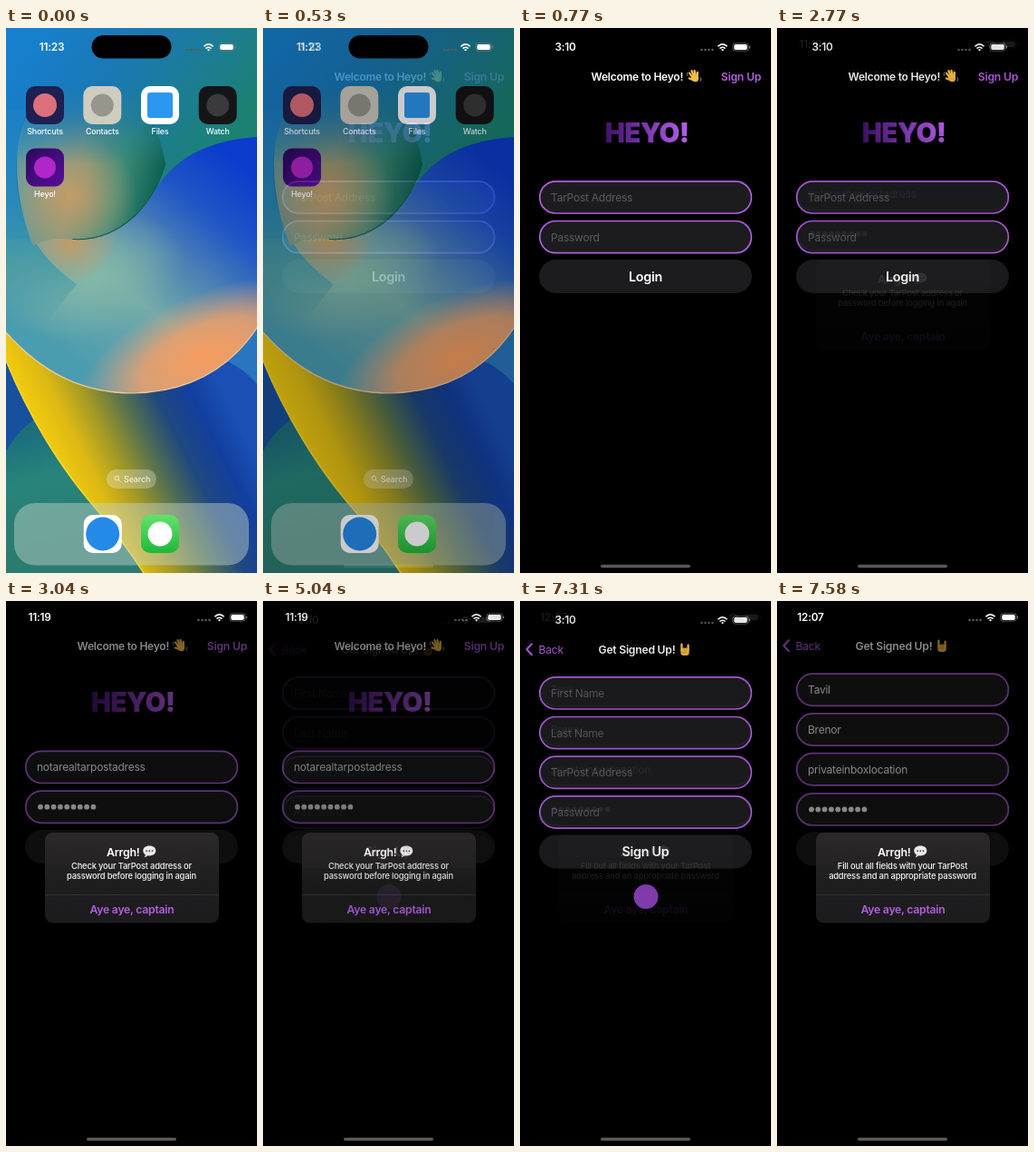
Recreate the animation shown at these times as an HTML page. Size 277x600 px, loop 8 s.

```html
<!DOCTYPE html>
<html lang="en">
<head>
<meta charset="utf-8">
<title>App walkthrough</title>
<style>
html, body { margin: 0; width: 100%; height: 100%; overflow: hidden; background: #000; }
svg { display: block; width: 100%; height: 100%; }
text { font-family: Inter, Roboto, sans-serif; letter-spacing: -.02em; white-space: pre; }
</style>
</head>
<body>
<svg id="stage" viewBox="0 0 277 600">
  <defs>
    <linearGradient id="word"><stop stop-color="#3f1263"/><stop offset=".45" stop-color="#7a34ad"/><stop offset="1" stop-color="#b65fe8"/></linearGradient>
    <linearGradient id="sheet" x2="0" y2="1"><stop stop-color="#2c292a"/><stop offset=".55" stop-color="#1f1e1f"/><stop offset="1" stop-color="#1c1b1d"/></linearGradient>
    <linearGradient id="tile" x2="1" y2="1"><stop stop-color="#2b0a5c"/><stop offset="1" stop-color="#5a0d9c"/></linearGradient>
    <linearGradient id="green" x2="0" y2="1"><stop stop-color="#62e36a"/><stop offset="1" stop-color="#1fb83a"/></linearGradient>
    <linearGradient id="sky" gradientUnits="userSpaceOnUse" x1="30" y1="0" x2="225" y2="150"><stop stop-color="#1680cf"/><stop offset=".4" stop-color="#1a78b4"/><stop offset=".72" stop-color="#1c7d92"/><stop offset="1" stop-color="#1b8272"/></linearGradient>
    <linearGradient id="curl" gradientUnits="userSpaceOnUse" x1="20" y1="130" x2="172" y2="165"><stop stop-color="#5f9aa0"/><stop offset=".4" stop-color="#84997e"/><stop offset=".7" stop-color="#3f8d78"/><stop offset="1" stop-color="#0d6052"/></linearGradient>
    <linearGradient id="rise" gradientUnits="userSpaceOnUse" x1="0" y1="70" x2="0" y2="150"><stop stop-color="#000"/><stop offset=".35" stop-color="#333"/><stop offset="1" stop-color="#fff"/></linearGradient>
    <linearGradient id="side" gradientUnits="userSpaceOnUse" x1="0" y1="90" x2="0" y2="330"><stop stop-color="#1a80c8"/><stop offset=".45" stop-color="#2a8ab8"/><stop offset=".72" stop-color="#4a9ca4" stop-opacity=".85"/><stop offset="1" stop-color="#4a9ca4" stop-opacity="0"/></linearGradient>
    <linearGradient id="orb" gradientUnits="userSpaceOnUse" x1="250" y1="145" x2="70" y2="365"><stop stop-color="#0c3ccb"/><stop offset=".22" stop-color="#1f55c6"/><stop offset=".42" stop-color="#4a80b4"/><stop offset=".65" stop-color="#74aaa8"/><stop offset="1" stop-color="#4a9cb0"/></linearGradient>
    <linearGradient id="band" gradientUnits="userSpaceOnUse" x1="60" y1="490" x2="240" y2="400"><stop stop-color="#f2cb10"/><stop offset=".16" stop-color="#dcb914"/><stop offset=".31" stop-color="#a59a24"/><stop offset=".49" stop-color="#55704f"/><stop offset=".66" stop-color="#1f4880"/><stop offset=".84" stop-color="#123f9e"/><stop offset="1" stop-color="#1a50b4"/></linearGradient>
    <linearGradient id="floor" gradientUnits="userSpaceOnUse" x1="0" y1="455" x2="30" y2="570"><stop stop-color="#1d6f7c"/><stop offset=".4" stop-color="#27847a"/><stop offset="1" stop-color="#2b7c70"/></linearGradient>
    <radialGradient id="peach"><stop stop-color="#f89c5c"/><stop offset=".5" stop-color="#eda06c" stop-opacity=".85"/><stop offset="1" stop-color="#d8a080" stop-opacity="0"/></radialGradient>
    <radialGradient id="mint"><stop stop-color="#84b8a8"/><stop offset="1" stop-color="#84b8a8" stop-opacity="0"/></radialGradient>
    <radialGradient id="tan"><stop stop-color="#c29c66"/><stop offset="1" stop-color="#b89d70" stop-opacity="0"/></radialGradient>
    <mask id="riseMask"><rect width="277" height="600" fill="url(#rise)"/></mask>
    <clipPath id="orbClip"><path d="M277 120C215 124 184 148 165 178C146 211 115 236 74 232H0V335C40 380 85 402 140 402C198 401 245 378 277 330Z"/></clipPath>
    <clipPath id="curlClip"><path d="M12 150C12 90 42 56 92 56C143 60 168 100 176 150C163 196 125 236 74 233C45 229 30 240 30 240C18 210 12 180 12 150Z"/></clipPath>
  </defs>
</svg>
<script>
const LOOP = 8000, STEP = 30, STEPS = 10;
const CUTS = [500, 2770, 5040, 7310];
const PURPLE = '#b35fe0', FIELD = '#1c1c1e', HINT = '#5b5b60';
const APP = 'Heyo!', MAIL = 'TarPost';

const text = (x, y, s, size, fill = '#fff', weight = 400, anchor = 'start') =>
  `<text x="${x}" y="${y + size * .363}" font-size="${size}" fill="${fill}" font-weight="${weight}" text-anchor="${anchor}">${s}</text>`;
const mid = (x, y, s, size, fill, weight) => text(x, y, s, size, fill, weight, 'middle');
const box = (x, y, w, h, r, fill, extra = '') =>
  `<rect x="${x}" y="${y}" width="${w}" height="${h}" rx="${r}" fill="${fill}" ${extra}/>`;
const dot = (x, y, r, fill) => `<circle cx="${x}" cy="${y}" r="${r}" fill="${fill}"/>`;
const oval = (x, y, rx, ry, fill, turn = 0) =>
  `<ellipse rx="${rx}" ry="${ry}" fill="${fill}" transform="translate(${x} ${y}) rotate(${turn})"/>`;
const path = (d, fill, extra = '') => `<path d="${d}" fill="${fill}" ${extra}/>`;
const line = (d, color, width) =>
  path(d, 'none', `stroke="${color}" stroke-width="${width}" stroke-linecap="round" stroke-linejoin="round"`);
const row = (n, f) => Array.from({ length: n }, (_, i) => f(i)).join('');
const at = (x, y, s, turn = 0) => `<g transform="translate(${x} ${y}) rotate(${turn})">${s}</g>`;

function status(time, x, y, right) {
  const wifi = line('M-4.6 -1.2Q0 -5 4.6 -1.2', '#fff', 1.7) + line('M-2.5 1.2Q0 -.8 2.5 1.2', '#fff', 1.6) + dot(0, 3.1, 1.2, '#fff');
  const battery = box(-8.6, -4.1, 17.2, 8.2, 2.5, 'none', 'stroke="#777" stroke-width=".8"') +
    box(-7.2, -2.9, 14.4, 5.8, 1.6, '#fff') + box(9.4, -1.4, 1.2, 2.8, .6, '#777');
  return mid(x, y, time, 11.8, '#fff', 600) +
    row(4, i => dot(right - 43 + i * 4, y + 3, 1.3, '#5c5c5f')) +
    at(right - 20, y, wifi) + at(right, y, battery);
}

const wave = (x, y) => at(x, y,
  line('M-2 0L-3.6 -5M0 -1L-.6 -6.5M2 -1L2.4 -5.8M3.6 1L5 -3M-2 3.5L-5.6 .5', '#f6bd45', 2.3) +
  path('M-3.2 -.8L4.6 .2Q5 6 1 6.5Q-2 6.5 -4 2Z', '#f6bd45') +
  line('M-7 -3.4Q-6.8 -5.4 -5.4 -6.4M6.7 4Q6.6 5.8 5.2 7', '#6f9fc0', .9), -18);

const horns = (x, y) => at(x, y,
  line('M-3.6 1V-5.6M3.6 1V-4.6', '#f6bd45', 2.3) +
  box(-4.7, -1.4, 9.4, 8, 3, '#f6bd45') +
  line('M-.9 -1.2V1.8M1.4 -1.2V1.8', '#d99b2b', 1.5) + line('M-3 3.4L1.2 2.8', '#e0a635', 1.7));

const bubble = (x, y) => at(x, y,
  path('M0 -6C4.5 -6 7 -3.6 7 -.6C7 2.6 4 4.8 0 4.8Q-1 4.8 -2 4.6Q-3.4 6.3 -5.6 6.6Q-4.4 5 -4.6 3.6C-6.2 2.6 -7 1 -7 -.6C-7 -3.6 -4.5 -6 0 -6Z', '#eee9ec') +
  row(3, i => dot(i * 3.2 - 3.2, -.4, .9, '#4a4548')));

const field = (y, s, fill) =>
  box(21.8, y + .8, 233.6, 35.2, 17.6, FIELD, `stroke="${PURPLE}" stroke-width="1.7"`) + text(34, y + 18.6, s, 12, fill);
const hint = (y, s) => field(y, s, HINT);
const secret = y => field(y, '') + row(9, i => dot(38 + i * 7.3, y + 18.4, 2.9, '#fff'));
const blank = y => box(21, y, 235, 37, 18.5, FIELD);
const button = (y, s) => blank(y) + mid(138.5, y + 18.5, s, 14.4, '#fff', 600);
const back = y => line(`M13 ${y - 6}L7.4 ${y}L13 ${y + 6}`, PURPLE, 2) + text(20.5, y, 'Back', 12.2, PURPLE);

const loginBar = y => text(78.5, y, `Welcome to ${APP}`, 12, '#fff', 600) + wave(192, y) +
  text(266, y, 'Sign Up', 12.2, PURPLE, 600, 'end');
const joinBar = y => back(y) + text(86.5, y, 'Get Signed Up!', 12.2, '#fff', 600) + horns(182, y);
const wordmark = y => mid(140, y, APP.toUpperCase(), 29.5, 'url(#word)', 900);
const emblem = () => dot(139, 325.5, 13.5, '#8a3fba');

const screen = s => box(0, 0, 277, 600, 0, '#000') + s + box(89, 590.7, 99, 3.6, 1.8, '#59595b');
const dim = s => `<g opacity=".53">${s}</g>`;

function alertBox(first, second) {
  return box(43, 255, 192, 99.5, 8.5, 'url(#sheet)') + box(43, 323, 192, .7, 0, '#3d3b3d') +
    text(111, 276, 'Arrgh!', 12.4, '#fff', 600) + bubble(158.3, 275.6) +
    mid(138.5, 291.3, first, 9.4, '#f4f4f4', 500) + mid(138.5, 302.7, second, 9.4, '#f4f4f4', 500) +
    mid(139, 339.3, 'Aye aye, captain', 12.2, PURPLE, 600);
}

function wallpaper() {
  const ground = path('M0 330H277V600H0Z', 'url(#floor)') +
    path('M0 330L60 400L30 432Q12 444 0 466Z', '#17509c') +
    path('M0 330V366C24 425 60 485 100 530Q130 566 152 600H277V330Z', 'url(#band)') +
    path('M277 325L238 364Q262 374 277 392Z', '#2a76be') +
    line('M0 366C24 425 60 485 100 530Q130 566 152 600', '#f5d838', 1.5);
  const curl = box(0, 50, 190, 200, 0, 'url(#curl)') + oval(70, 185, 75, 70, 'url(#tan)') +
    line('M176 150C163 196 125 236 74 233', '#0d5a58', 2);
  const orb = box(0, 110, 277, 300, 0, 'url(#orb)') + oval(95, 275, 105, 65, 'url(#mint)', -20) +
    oval(218, 362, 150, 68, 'url(#peach)', -24);
  return box(0, 0, 277, 600, 0, 'url(#sky)') + ground +
    `<g clip-path="url(#orbClip)">${orb}</g>` +
    path('M0 90H24C8 125 8 170 18 203C28 238 50 262 78 282L40 330H0Z', 'url(#side)') +
    path('M14 190C26 238 50 262 78 282Q112 268 128 215Z', 'url(#tan)') +
    `<g mask="url(#riseMask)"><g clip-path="url(#curlClip)">${curl}</g></g>` +
    line('M0 335C40 380 85 402 140 402C198 401 245 378 277 330', '#efc99a', 1.2);
}

function app(x, y, tile, mark, label = '') {
  return box(x, y, 42, 42, 10, tile) + mark(x + 21, y + 21) + mid(x + 21, y + 50, label, 8.9, '#fff', 500);
}
const disc = (r, fill) => (x, y) => dot(x, y, r, fill);
const square = (s, fill) => (x, y) => box(x - s / 2, y - s / 2, s, s, 3, fill);

function home() {
  return wallpaper() + box(94.5, 8, 88, 25.5, 12.75, '#000') + status('11:23', 50.5, 21, 243.5) +
    app(22, 64, '#1d2050', disc(13, '#dd6f7c'), 'Shortcuts') +
    app(85.3, 64, '#cfccc0', disc(12.5, '#98958c'), 'Contacts') +
    app(149, 64, '#fff', square(28, '#2c97ee'), 'Files') +
    app(212.7, 64, '#151517', disc(12.5, '#3a3a3c'), 'Watch') +
    app(22, 132.5, 'url(#tile)', disc(12, '#b026c8'), APP) +
    box(111, 486, 55, 21, 10.5, '#fff', 'opacity=".27"') +
    `<g opacity=".8"><circle cx="122.4" cy="495.6" r="2.3" fill="none" stroke="#fff" stroke-width=".9"/>` +
    line('M124.2 497.4L126 499.2', '#fff', .9) + text(130, 496.5, 'Search', 9, '#fff', 500) + '</g>' +
    box(9, 523, 259, 68.5, 23, '#c4d4cc', 'opacity=".45"') +
    app(85.7, 536, '#fff', disc(18.5, '#2589e8')) +
    app(149, 536, 'url(#green)', disc(13.5, '#fff'));
}

const login = () => screen(status('3:10', 50, 21, 243.5) + loginBar(53.3) + wordmark(115) +
  hint(168, `${MAIL} Address`) + hint(211.7, 'Password') + button(255, 'Login'));

const loginError = () => screen(
  dim(loginBar(49.3) + wordmark(111.3) + field(164.5, 'notarealtarpostadress', '#fff') + secret(208.3) + blank(252)) +
  status('11:19', 37, 18, 255.5) +
  alertBox(`Check your ${MAIL} address or`, 'password before logging in again'));

const join = () => screen(status('3:10', 50, 21, 243.5) + joinBar(53.3) +
  ['First Name', 'Last Name', `${MAIL} Address`, 'Password'].map((s, i) => hint(83 + i * 43.7, s)).join('') +
  button(257.5, 'Sign Up') + emblem());

const joinError = () => screen(
  dim(joinBar(49.3) + ['Tavil', 'Brenor', 'privateinboxlocation'].map((s, i) => field(79.3 + i * 43.8, s, '#fff')).join('') +
    secret(211) + blank(254.5)) +
  status('12:07', 37, 18, 255.5) +
  alertBox(`Fill out all fields with your ${MAIL}`, 'address and an appropriate password'));

const stage = document.getElementById('stage');
stage.insertAdjacentHTML('beforeend',
  [home, login, loginError, join, joinError].map(f => `<g class="scene">${f()}</g>`).join(''));
const scenes = [...stage.querySelectorAll('.scene')];

// Each screen dissolves over the previous one in ten even steps.
const fade = (t, start) => t < start ? 0 : Math.min(1, (Math.floor((t - start) / STEP) + 1) / STEPS);

function draw(t) {
  const alphas = [1, ...CUTS.map(c => fade(t, c))];
  scenes.forEach((g, i) => {
    g.style.display = alphas[i] > 0 && !(alphas[i + 1] >= 1) ? '' : 'none';
    g.setAttribute('opacity', alphas[i]);
  });
}

function tick() {
  draw(performance.now() % LOOP);
  requestAnimationFrame(tick);
}
tick();
</script>
</body>
</html>
```
